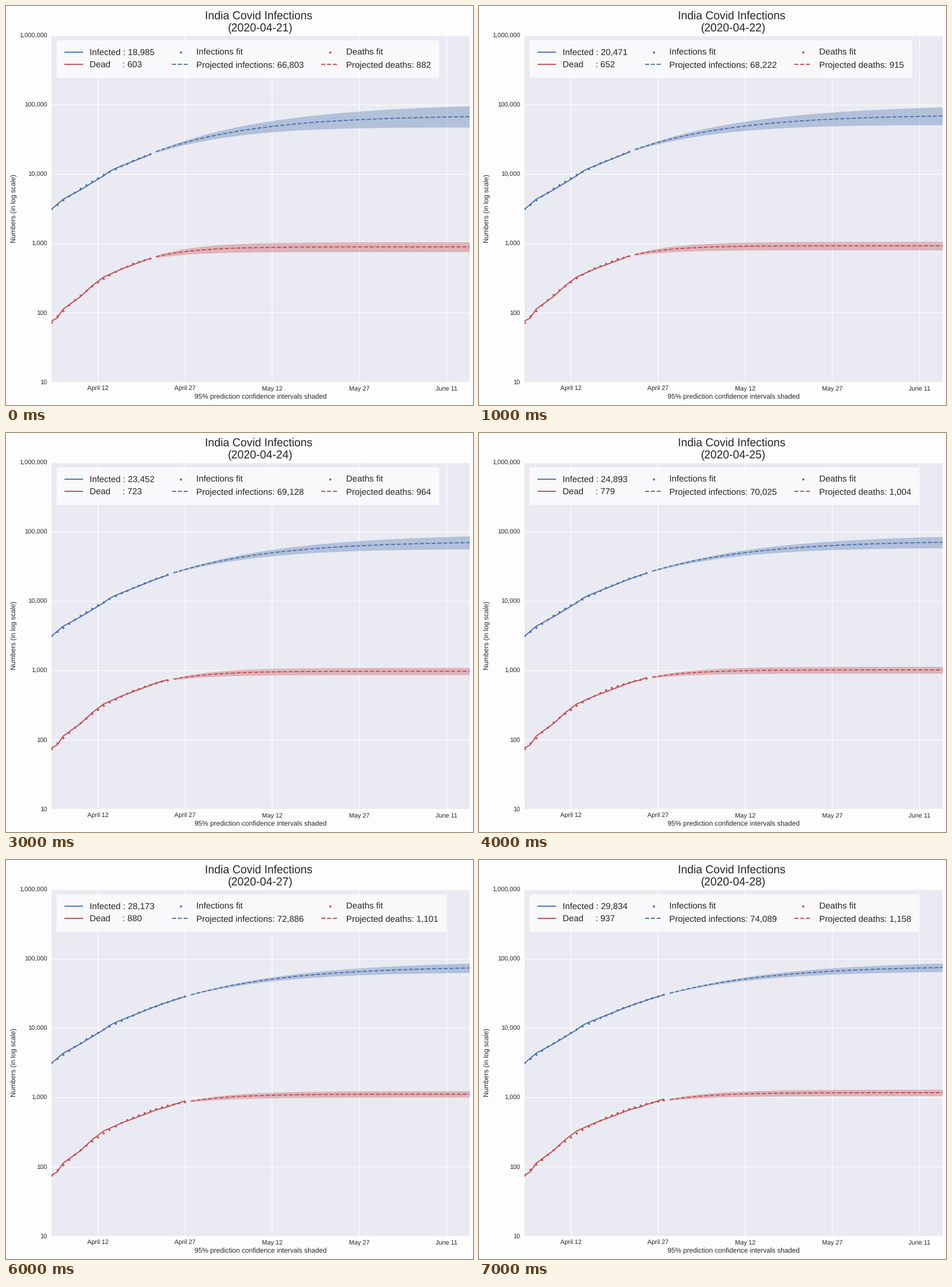
Animation, 810 px wide and 691 px high, one loop 8 s. Source, as a matplotlib script:

```python
import numpy as np
import matplotlib.pyplot as plt
from matplotlib.animation import FuncAnimation

W, H, DPI = 810, 691, 78
BLUE, RED, INK = "#4C72B0", "#C44E52", "0.15"
LAST_DAY = 72      # June 15, counted from April 4
FIRST_REPORT = 17  # April 21

plt.rcParams.update({
    "font.family": "Liberation Sans", "font.size": 10,
    "text.color": INK, "text.hinting": "none", "axes.labelcolor": INK,
    "xtick.color": INK, "ytick.color": INK,
    "axes.facecolor": "#EAEAF2", "figure.facecolor": "#FDFDFD",
    "axes.linewidth": 0, "axes.axisbelow": True,
    "axes.labelsize": 11, "axes.labelpad": 2.8,
    "grid.color": "white", "grid.linewidth": 1,
    "lines.linewidth": 1.75, "lines.solid_capstyle": "round",
    "lines.markersize": 7, "lines.markeredgewidth": 0,
    "patch.linewidth": 0.3,
    "xtick.major.pad": 7, "ytick.major.pad": 7,
})


def log_interp(days, values):
    """Whole-number counts, exponential between the key points."""
    return lambda t: np.rint(np.exp(np.interp(t, days, np.log(values))))


def growth_curve(n0, t1, n1, n2, theta):
    """Richards curve through (0, n0), (t1, n1) and (LAST_DAY, n2)."""
    u0, u1, u2 = (n ** -theta for n in (n0, n1, n2))
    goal = (u0 - u1) / (u0 - u2)
    lo, hi = 1e-3, 1.0
    for _ in range(50):
        c = (lo + hi) / 2
        if (1 - np.exp(-c * t1)) / (1 - np.exp(-c * LAST_DAY)) < goal:
            lo = c
        else:
            hi = c
    b = (u0 - u2) / (1 - np.exp(-c * LAST_DAY))
    return lambda t: (u0 - b * (1 - np.exp(-c * t))) ** (-1 / theta)


# Key points: day and total
report_days = [17, 18, 20, 21, 22, 24]
infected = log_interp(
    [0, 2, 5, 9, 10, 11] + report_days,
    [3072, 4281, 5865, 9352, 10815, 11933,
     18985, 20471, 23452, 24893, 26605, 29834])
dead = log_interp(
    [0, 1, 2, 5, 7, 9, 12] + report_days,
    [75, 83, 111, 169, 242, 324, 420, 603, 652, 723, 779, 826, 937])
infected_final = log_interp(
    report_days, [66803, 68222, 69128, 70025, 71703, 74089])
dead_final = log_interp(report_days, [882, 915, 964, 1004, 1047, 1158])


def setup_axes():
    ax.clear()
    ax.set_yscale("log")
    ax.set(xlim=(0, LAST_DAY), ylim=(10, 1e6))
    ax.set_xticks(range(8, LAST_DAY, 15),
                  ["April 12", "April 27", "May 12", "May 27", "June 11"])
    levels = [10 ** k for k in range(1, 7)]
    ax.set_yticks(levels, [f"{v:,}" for v in levels])
    ax.tick_params(which="both", length=0)
    ax.grid(True, which="major")
    ax.set_xlabel("95% prediction confidence intervals shaded")
    ax.set_ylabel("Numbers (in log scale)")


def draw_series(color, counts, curve, half, today, labels):
    past = np.arange(today + 1)
    ahead = np.arange(today + 1, LAST_DAY + 1)
    mid = curve(ahead)
    ax.fill_between(ahead, mid * 10 ** -half, mid * 10 ** half,
                    color=color, alpha=0.35, lw=0)
    line, = ax.plot(past, counts(past), color=color, label=labels[0])
    fit, = ax.plot(past, curve(past), ".", color=color, label=labels[1])
    proj, = ax.plot(ahead, mid, "--", color=color, label=labels[2])
    return line, fit, proj


def draw(i):
    setup_axes()
    today = FIRST_REPORT + i
    start = today + 1
    wait = np.arange(LAST_DAY - today)
    s = wait / wait[-1]

    # The forecast starts a little off today's total; its band narrows daily
    now, final = infected(today), infected_final(today)
    curve = growth_curve(3120, start, now * (1.098 - 0.006 * i), final, 0.2)
    band = 0.045 + 0.109 * np.exp(-i / 3.7)
    half = band * (0.08 + 0.92 * (1.5 * s - 0.5 * s ** 2))
    inf = draw_series(BLUE, infected, curve, half, today, (
        f"Infected : {now:,.0f}", "Infections fit",
        f"Projected infections: {final:,.0f}"))

    now, final = dead(today), dead_final(today)
    curve = growth_curve(72 + 0.06 * i ** 2, start,
                         now * (1.055 - 0.0102 * i), final, 0.6)
    band = 0.046 + 0.025 * np.exp(-i / 2)
    half = band * (1 - 0.78 * np.exp(-wait / 8))
    dth = draw_series(RED, dead, curve, half, today, (
        f"Dead     : {now:,.0f}", "Deaths fit",
        f"Projected deaths: {final:,.0f}"))

    ax.set_title(f"India Covid Infections \n(2020-04-{today + 4})", fontsize=18)
    ax.legend(handles=[inf[0], dth[0], *inf[1:], *dth[1:]], ncol=3,
              loc="upper left", fontsize=14, borderpad=1, borderaxespad=0.55,
              frameon=True, facecolor="white", framealpha=0.75)


# The small surplus keeps the pixel size from rounding down
fig = plt.figure(figsize=((W + 0.01) / DPI, (H + 0.01) / DPI), dpi=DPI)
ax = fig.add_axes([78.8 / W, (H - 650.6) / H, 725 / W, 600 / H])
anim = FuncAnimation(fig, draw, frames=8, interval=1000, repeat=True)
plt.show()
```
